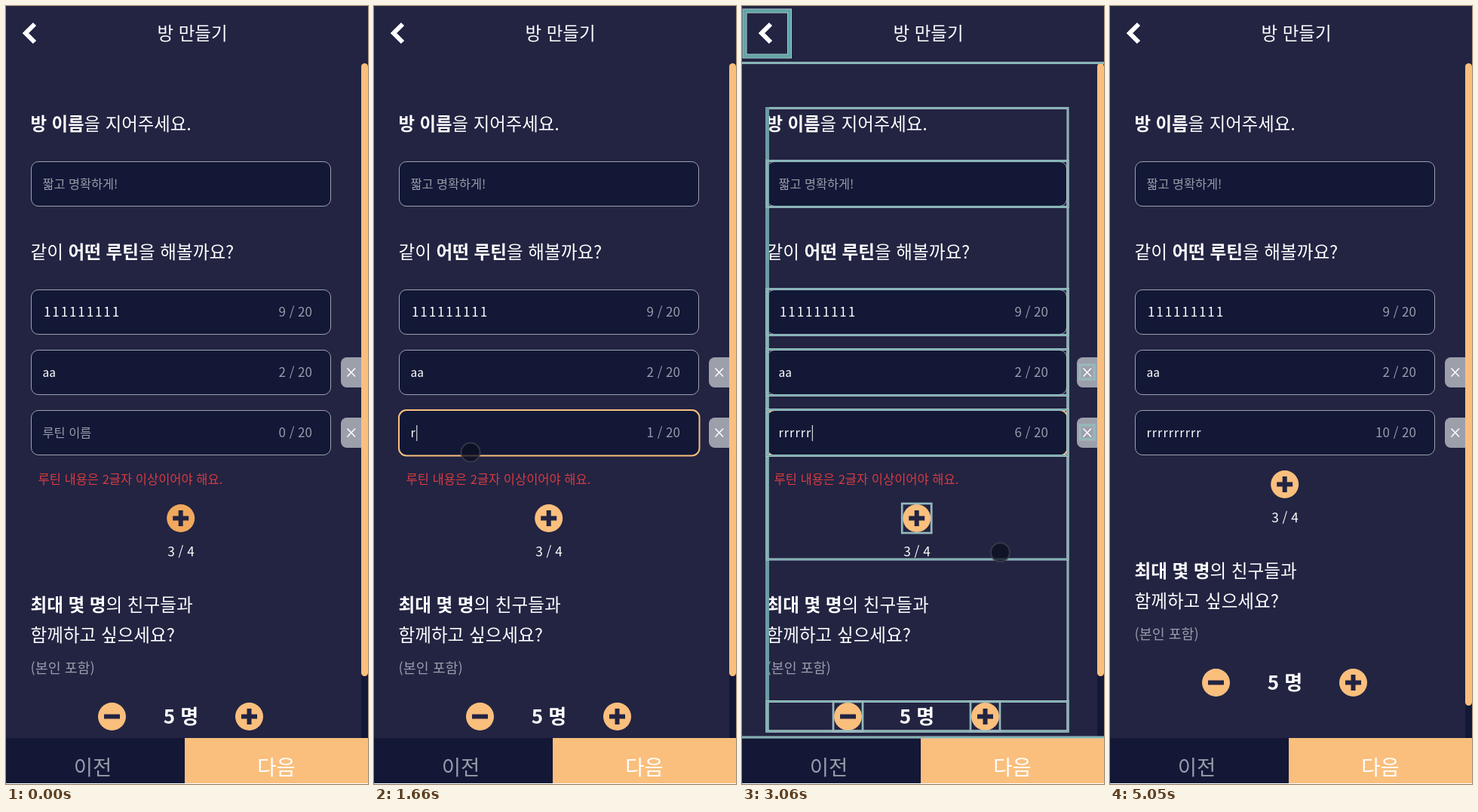
An HTML page for the animation above (5910 ms loop, 480 px wide and 1032 px high).

```html
<!DOCTYPE html>
<html lang="ko">
<head>
<meta charset="utf-8">
<style>
  html, body { margin: 0; width: 100%; height: 100%; overflow: hidden; background: #222442; }
  svg { display: block; font-family: "Noto Sans CJK KR", "Noto Sans CJK", "Noto Sans", sans-serif; font-weight: 300; }
  .b { font-weight: 700; }
</style>
</head>
<body>
<svg id="stage" width="480" height="1032" viewBox="0 0 480 1032"></svg>
<script>
const stage = document.getElementById('stage');
const LOOP = 5910, TICK = 66.5;
const BG = '#222442', DARK = '#121836', GOLD = '#fabf7d', GREY = '#9a9cab';

// All event times are in ticks of about 1/15 s.
const FOCUS = 8, BLUR = 72, POINTER_END = 75;
const burst = (start, count) => Array.from({ length: count }, (_, i) => Math.round(start + i * 4.09));
const KEYS = [...burst(25, 7), ...burst(59, 3)];

// Pointer moves: start tick, end tick, destination.
const MOVES = [
  [1, 3, 69, 555], [5, 8, 93, 566], [19, 25, 128, 592],
  [25, 34, 351, 727], [34, 55, 336, 723], [67, 72, 400, 810]
];

const rowY = i => 376 + 80 * i;
const rect = (x, y, w, h, fill, more = '') =>
  `<rect x="${x}" y="${y}" width="${w}" height="${h}" fill="${fill}" ${more}/>`;
const path = (d, stroke, width) =>
  `<path d="${d}" fill="none" stroke="${stroke}" stroke-width="${width}"/>`;
// Text centred vertically on y.
const text = (s, x, y, size, fill = '#fff', more = '') =>
  `<text x="${x}" y="${y + size * .37}" font-size="${size}" fill="${fill}" ${more}>${s}</text>`;
const bold = s => `<tspan class="b">${s}</tspan>`;
const MID = 'text-anchor="middle"', END = 'text-anchor="end"';

function field(y, focused) {
  return focused
    ? rect(33, y, 398.5, 60.5, DARK, `rx="10" stroke="${GOLD}" stroke-width="2"`)
    : rect(33.5, y + .5, 397, 59, DARK, 'rx="9.5" stroke="#a0a1ad"');
}

function removeButton(y) {
  return `<path d="M471 ${y - 20}h-19a8 8 0 0 0-8 8v24a8 8 0 0 0 8 8h19z" fill="#9da0ab"/>` +
    path(`M452.5 ${y - 5.5}l10.5 11m0-11l-10.5 11`, '#fff', 1.5);
}

function row(i, content, length, focused) {
  const y = rowY(i);
  return field(y, focused) + content(y + 30) +
    text(`${length} / 20`, 406, y + 30, 17, GREY, END) + (i ? removeButton(y + 30) : '');
}

function roundButton(x, y, plus, fill = GOLD) {
  return `<circle cx="${x}" cy="${y}" r="18.5" fill="${fill}"/>` +
    path(`M${x - 10.5} ${y}h21` + (plus ? `M${x} ${y - 10.5}v21` : ''), BG, 6);
}

// Light frame with a teal core.
function outline(x, y, w, h, width = 3) {
  const frame = (color, size) => rect(x, y, w, h, 'none', `stroke="${color}" stroke-width="${size}"`);
  return frame('#b4c8cc', width) + frame('#5fa5a6', width - 1.8);
}

function outlines(shift) {
  const around = (x, y, r) => outline(x - r, y - r, 2 * r, 2 * r, 2.6);
  let out = outline(3.5, 6.5, 59.5, 60, 6) + outline(-2, -2, 484, 77.5) + outline(-2, 970, 484, 70) +
    outline(33, 135.5, 399, 826.5 - shift) + rect(31, 134, 5, 829 - shift, '#6b9da2') +
    outline(33, 205.5, 399, 61) +
    outline(33, 375.5, 399, 358.5 - shift) + outline(33, 922.5 - shift, 399, 39.5);
  for (let i = 0; i < 3; i++) {
    out += outline(33, rowY(i) - .5, 399, 61);
    if (i) out += around(457.5, rowY(i) + 29.5, 9.5);
  }
  return out + around(231.7, 679.5 - shift, 19.5) +
    [140.5, 322.5].map(x => around(x, 942.5 - shift, 19.5)).join('');
}

function popup(opacity) {
  const items = ['123', 'b', 'cccccccc', '벤치프레스'];
  return `<g opacity="${opacity}">` + rect(157, 607, 195, 191, '#fff', 'rx="8"') +
    '<path d="M172 608l10.5-10 10.5 10z" fill="#fff"/>' +
    items.map((s, i) => text(s, 172.5, 635 + 45 * i, 16, '#222')).join('') + '</g>';
}

function pointer(n) {
  if (n < 1 || n >= POINTER_END) return '';
  let x = 268, y = 800;
  for (const [start, end, toX, toY] of MOVES) {
    const k = Math.min(1, Math.max(0, (n - start) / (end - start)));
    x += (toX - x) * k;
    y += (toY - y) * k;
  }
  return `<circle cx="${x}" cy="${y}" r="12.5" fill="#0c0f20" fill-opacity=".75"
    stroke="#3f404c" stroke-opacity=".8" stroke-width="2"/>`;
}

function draw(n) {
  const typed = KEYS.filter(k => k <= n).length;
  const focused = n >= FOCUS && n < BLUR;
  const shift = n >= BLUR ? 45 : 0;
  const caret = focused && (typed || (n - FOCUS) % 16 < 8);
  const flash = [...KEYS, BLUR].some(k => n > k && n < k + 4);

  const ones = y => text('111111111', 50, y, 17, '#fff', 'letter-spacing="1.9"');
  const letters = y => text('aa', 48.5, y, 15.5);
  const entry = y => typed
    ? text('r'.repeat(typed), 48.5, y, 16, '#fff', 'letter-spacing="1.1"')
    : text('루틴 이름', 48.5, y, 16.4, GREY);

  let out = rect(0, 0, 480, 1032, BG) +
    path('M38 24L26 36L38 48', '#fff', 6) +
    text('방 만들기', 247, 36, 23.5, '#fff', MID) +
    rect(471, 76, 9, 895, DARK) +
    rect(471, 76, 9, shift ? 852 : 813, GOLD, 'rx="4.5"') +

    text(bold('방 이름') + '을 지어주세요.', 32.5, 156, 23.4) +
    field(206) + text('짧고 명확하게!', 48.5, 236, 16.3, GREY) +
    text('같이 ' + bold('어떤 루틴') + '을 해볼까요?', 32.5, 326, 23.6) +
    row(0, ones, 9) + row(1, letters, 2) + row(2, entry, typed, focused) +
    (caret ? path(`M${49.5 + typed * 7.3} 556v21`, '#fff', 1) : '') +
    (shift ? '' : text('루틴 내용은 2글자 이상이어야 해요.', 42.5, 628, 16.5, '#d93a40')) +

    `<g transform="translate(0 ${-shift})">` +
    roundButton(231.7, 679.5, true, n ? GOLD : '#f0a85e') +
    text('3 / 4', 232, 724, 17.2, '#fff', MID) +
    text(bold('최대 몇 명') + '의 친구들과', 32.5, 794, 23.6) +
    text('함께하고 싶으세요?', 32.5, 834, 23.6) +
    text('(본인 포함)', 32.5, 878, 18.4, GREY) +
    roundButton(140.5, 942.5, false) +
    text(bold('5 명'), 232, 942, 26, '#fff', MID) +
    roundButton(322.5, 942.5, true) + '</g>' +

    rect(0, 971, 237, 60, DARK) + rect(237, 971, 243, 60, GOLD) +
    text('이전', 115, 1010, 27.5, GREY, MID) +
    text('다음', 358.5, 1010, 27.5, '#fff', MID);

  if (flash) out += outlines(shift);
  if (n > FOCUS && n < KEYS[0]) out += popup(n === FOCUS + 1 ? .5 : 1);
  return out + pointer(n) + rect(0, 1031, 480, 1, '#fff');
}

let shown = -1;
function frame() {
  const n = Math.floor((performance.now() % LOOP + 8) / TICK);
  if (n !== shown) stage.innerHTML = draw(shown = n);
  requestAnimationFrame(frame);
}
frame();
</script>
</body>
</html>
```
